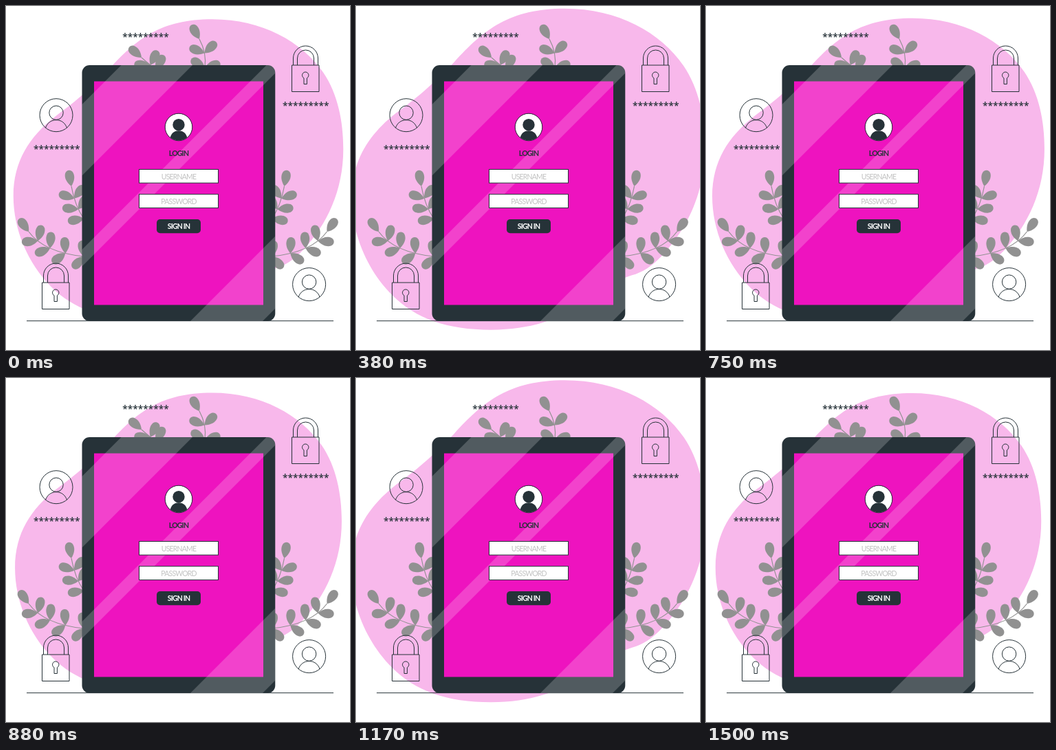
These frames come from a looping animation (500 px wide and 500 px high, 1540 ms). An HTML page:

```html
<!DOCTYPE html>
<html lang="en">
<head>
<meta charset="utf-8">
<title>Login</title>
<style>
html, body { margin: 0; width: 100%; height: 100%; overflow: hidden; background: #fff; }
svg { display: block; width: 100%; height: 100%; }
.line { fill: none; stroke: #263238; stroke-width: 1; }
.field { fill: #fff; stroke: #263238; }
.dark { fill: #263238; }
.leaf { fill: #919191; }
.stem { fill: none; stroke: #919191; stroke-width: 1.2; }
.label { font: 10.5px Lato, sans-serif; letter-spacing: -.08em; text-anchor: middle; }
.strong { font-weight: 700; }
.stars { font: 600 13.7px "Open Sans", sans-serif; text-anchor: middle; fill: #263238; }
</style>
</head>
<body>
<svg viewBox="0 0 500 500">
  <defs>
    <clipPath id="body"><rect x="110.5" y="86" width="280.8" height="372" rx="11"/></clipPath>
    <clipPath id="face"><circle cx="251" cy="176" r="19.5"/></clipPath>
    <g id="user" class="line">
      <circle r="24"/><circle cy="-3.5" r="10.2"/>
      <path d="M-15.5 18.5C-13 11 -7 7 0 7S13 11 15.5 18.5"/>
    </g>
    <g id="lock" class="line">
      <path d="M.5 .5H40V39H.5ZM2.5 .5V-9.5a18 18 0 0 1 36 0V.5M8.5 .5V-9.5a12 12 0 0 1 24 0V.5"/>
      <path d="M18 19.3a4.7 4.7 0 1 1 4.4 0V28H18Z"/>
    </g>
    <g id="side"></g>
  </defs>

  <path id="blob" fill="#f8b8eb" d="M300 19.5C372 19.5 430 52 461 97C482 128 490 168 490 208C490 268 466 318 432 354C418 369 405 377 391 381C340 396 310 455 200 455C140 455 98 440 66 408C32 374 11 325 11 276C11 225 35 190 70 162C100 140 118 125 150 92C190 48 225 19.5 300 19.5Z"/>

  <use href="#side"/>
  <use href="#side" transform="matrix(-1 0 0 1 499.5 0)"/>
  <g id="top"></g>

  <path class="line" d="M30 457.7H476"/>
  <g clip-path="url(#body)">
    <rect class="dark" x="110" y="86" width="282" height="372"/>
    <rect x="128" y="109.5" width="246" height="325" fill="#ee13bf"/>
    <g id="shine" fill="#fff" fill-opacity=".2"></g>
  </g>

  <g clip-path="url(#face)">
    <circle cx="251" cy="176" r="20" fill="#fff"/>
    <circle class="dark" cx="251" cy="172.7" r="8.7"/>
    <path class="dark" d="M238 197C238 187 243 181.3 251 181.3S264 187 264 197Z"/>
  </g>
  <circle class="line" cx="251" cy="176" r="19.8"/>
  <rect class="field" x="193.5" y="237.5" width="115" height="19.7"/>
  <rect class="field" x="193.5" y="273.7" width="115" height="19.7"/>
  <rect class="dark" x="219" y="310" width="64" height="20.3" rx="5"/>
  <text class="label strong dark" x="251" y="218.3">LOGIN</text>
  <text class="label" x="251" y="251.6" fill="#c2c2c2">USERNAME</text>
  <text class="label" x="251" y="287.6" fill="#c2c2c2">PASSWORD</text>
  <text class="label strong" x="251" y="324" fill="#fff">SIGN IN</text>

  <use href="#user" x="73" y="158.7"/>
  <use href="#user" x="440.6" y="404.6"/>
  <use href="#lock" x="415" y="85.5"/>
  <use href="#lock" x="52" y="401.5"/>
  <text class="stars" x="203" y="49.8">*********</text>
  <text class="stars" x="73.7" y="212.8">*********</text>
  <text class="stars" x="435.7" y="149.8">*********</text>
</svg>
<script>
const LOOP = 1540, STEP = 125 / 3;
const byId = id => document.getElementById(id);

function add(parent, attrs) {
  const path = document.createElementNS("http://www.w3.org/2000/svg", "path");
  for (const key in attrs) path.setAttribute(key, attrs[key]);
  byId(parent).append(path);
}

function leaf(parent, x, y, angle) {
  add(parent, {
    class: "leaf",
    d: "M0 0C.3 -.27 .6 -.34 .84 -.24C1.05 -.14 1.05 .14 .84 .24C.6 .34 .3 .27 0 0",
    transform: `translate(${x} ${y}) rotate(${angle}) scale(23.5)`
  });
}

// A curved stem with evenly spaced leaf pairs, opening wider towards the root, and one leaf on top.
function branch(parent, root, bend, tip, pairs, lean = 0) {
  add(parent, { class: "stem", d: `M${root}Q${bend} ${tip}` });
  const at = (t, k) => root[k] * (1 - t) ** 2 + 2 * bend[k] * t * (1 - t) + tip[k] * t * t;
  const slope = (t, k) => (bend[k] - root[k]) * (1 - t) + (tip[k] - bend[k]) * t;
  for (let i = 0; i <= pairs; i++) {
    const t = i / pairs, spread = 65 - 15 * t;
    const angle = Math.atan2(slope(t, 1), slope(t, 0)) * 180 / Math.PI;
    const turns = i < pairs ? [lean - spread, lean + spread] : [0];
    for (const turn of turns) leaf(parent, at(t, 0), at(t, 1), angle + turn);
  }
}

branch("side", [113, 364], [55, 358], [33, 328], 4, 12);
branch("side", [113, 309], [100, 290], [95, 262], 3);
branch("top", [289, 90], [292, 68], [281, 48], 2);
branch("top", [218, 92], [212, 88], [197, 75], 2, 20);

// Diagonal glare between the lines x + y = from and x + y = to.
const band = (from, to) => add("shine", { d: `M${from} 0H${to}L${to - 500} 500H${from - 500}Z` });
band(253.5, 357);
band(464.5, 489);
band(726, 831);

// Linear rise and fall, zero outside start..end.
const beat = (t, start, peak, end) =>
  Math.max(0, Math.min((t - start) / (peak - start), (end - t) / (end - peak)));

function draw() {
  const t = Math.floor((performance.now() % LOOP + 5) / STEP) * STEP;
  const phase = (t + 40) % LOOP;
  const scale = .9885 + .1 * beat(phase, 0, 318, 905) + .09 * beat(phase, 905, 1220, LOOP);
  byId("blob").setAttribute("transform",
    `translate(250.5 237) scale(${scale}) translate(-250.5 -237)`);
  requestAnimationFrame(draw);
}
draw();
</script>
</body>
</html>
```
